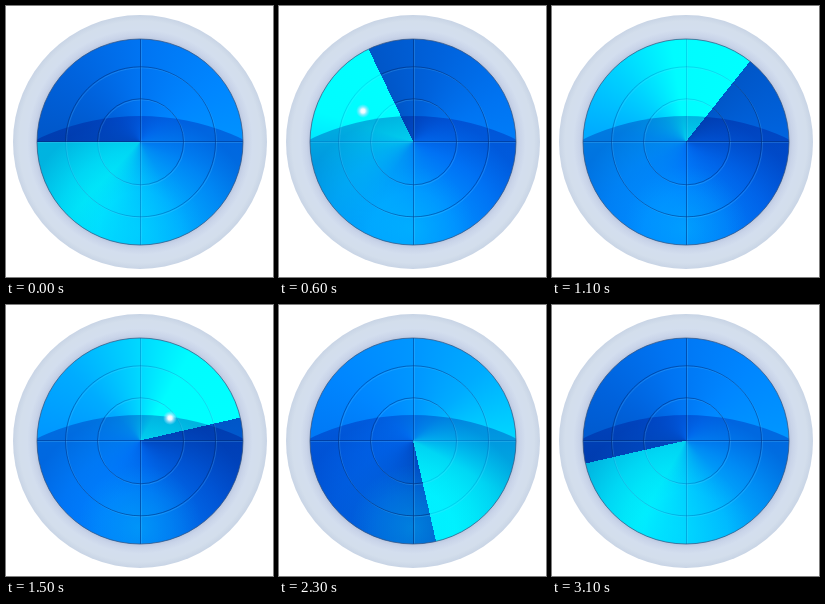
Recreate the animation shown at these times as an HTML page with a canvas. Size 267x271 px, loop 3.2 s.

```html
<!DOCTYPE html>
<html lang="en">
<head>
<meta charset="utf-8">
<title>Radar</title>
<style>
  html, body { margin: 0; width: 100%; height: 100%; overflow: hidden; background: #fff; }
  canvas { display: block; width: 267px; height: 271px; }
</style>
</head>
<body>
<canvas width="267" height="271"></canvas>
<script>
const ctx = document.querySelector('canvas').getContext('2d');
const TAU = Math.PI * 2;
const CX = 134, CY = 136, DISC = 103, RIM = 127;
const LOOP = 3200, TICK = 100, SWEEP_STEPS = 28;

// Clockwise from just ahead of the beam, all the way round to its bright edge.
const SWEEP = [
  [0, '#0056c8'], [0.12, '#0062dc'], [0.25, '#0074f2'], [0.4, '#0086ff'],
  [0.55, '#0098ff'], [0.66, '#00acff'], [0.77, '#00d2ff'], [0.87, '#00fcff'], [1, '#00ffff']
];
// Grid lines fade where the beam is bright.
const GRID_INK = [
  [0, 'rgba(0,45,120,.6)'], [0.6, 'rgba(0,50,130,.5)'],
  [0.85, 'rgba(0,90,170,.25)'], [1, 'rgba(0,110,190,.18)']
];
const BLIPS = [
  { x: 84, y: 105, start: 300 },
  { x: 164, y: 113, start: 1300 }
];
const BLIP_FADE = [0.55, 0.85, 1, 1, 0.65, 0.3];

function withStops(gradient, stops) {
  stops.forEach(([at, color]) => gradient.addColorStop(at, color));
  return gradient;
}

function radial(x, y, inner, outer, stops) {
  return withStops(ctx.createRadialGradient(x, y, inner, x, y, outer), stops);
}

function conic(angle, stops) {
  return withStops(ctx.createConicGradient(angle, CX, 135.5), stops);
}

function circle(x, y, r) {
  ctx.beginPath();
  ctx.arc(x, y, r, 0, TAU);
}

function drawRim() {
  circle(CX, CY, RIM);
  ctx.fillStyle = radial(CX, CY, DISC, RIM, [
    [0, '#bcc8e0'], [0.15, '#c9d4e9'], [0.4, '#d3deee'], [0.75, '#d3deec'], [1, '#c8d4e5']
  ]);
  ctx.fill();
}

function drawSweep(angle) {
  ctx.fillStyle = conic(angle, SWEEP);
  ctx.fillRect(0, 0, 267, 271);
}

function drawShade() {
  circle(CX, 348, 238);
  ctx.globalCompositeOperation = 'multiply';
  ctx.fillStyle = radial(CX, 228, 0, 120, [
    [0, '#fff'], [0.35, '#f8f8ff'], [0.7, '#d8d8f4'], [1, '#b4b4e0']
  ]);
  ctx.fill();
  ctx.globalCompositeOperation = 'source-over';
  ctx.fillStyle = radial(CX, 222, 0, 62, [
    [0, 'rgba(0,210,255,.32)'], [0.5, 'rgba(0,200,255,.18)'], [1, 'rgba(0,190,255,0)']
  ]);
  ctx.fill();
}

function strokeGrid(offset, ink) {
  ctx.strokeStyle = ink;
  ctx.lineWidth = 1;
  for (const r of [43, 75]) {
    circle(CX + 0.5 + offset, CY - 0.2 + offset, r);
    ctx.stroke();
  }
  ctx.beginPath();
  ctx.moveTo(CX + 0.5 + offset, CY - DISC);
  ctx.lineTo(CX + 0.5 + offset, CY + DISC);
  ctx.moveTo(CX - DISC, 135.5 + offset);
  ctx.lineTo(CX + DISC, 135.5 + offset);
  ctx.stroke();
}

function drawBlip({ x, y, start }, time) {
  const alpha = BLIP_FADE[Math.floor((time - start) / TICK)];
  if (!alpha) return;
  ctx.globalAlpha = alpha;
  circle(x, y, 7);
  ctx.fillStyle = radial(x, y, 0, 7, [
    [0, '#fff'], [0.3, 'rgba(245,250,255,.95)'],
    [0.6, 'rgba(190,230,255,.6)'], [1, 'rgba(160,225,255,0)']
  ]);
  ctx.fill();
  ctx.globalAlpha = 1;
}

function draw(time) {
  const step = Math.round(Math.floor(time / TICK) * SWEEP_STEPS * TICK / LOOP);
  const angle = Math.PI + step * TAU / SWEEP_STEPS;
  ctx.clearRect(0, 0, 267, 271);
  drawRim();
  ctx.save();
  circle(CX, CY, DISC);
  ctx.clip();
  drawSweep(angle);
  drawShade();
  strokeGrid(1, 'rgba(120,215,255,.2)');
  strokeGrid(0, conic(angle, GRID_INK));
  BLIPS.forEach(blip => drawBlip(blip, time));
  ctx.restore();
  circle(CX, CY, DISC);
  ctx.strokeStyle = 'rgba(50,80,125,.7)';
  ctx.stroke();
}

const began = performance.now();
function frame() {
  draw((performance.now() - began) % LOOP);
  requestAnimationFrame(frame);
}
frame();
</script>
</body>
</html>
```
